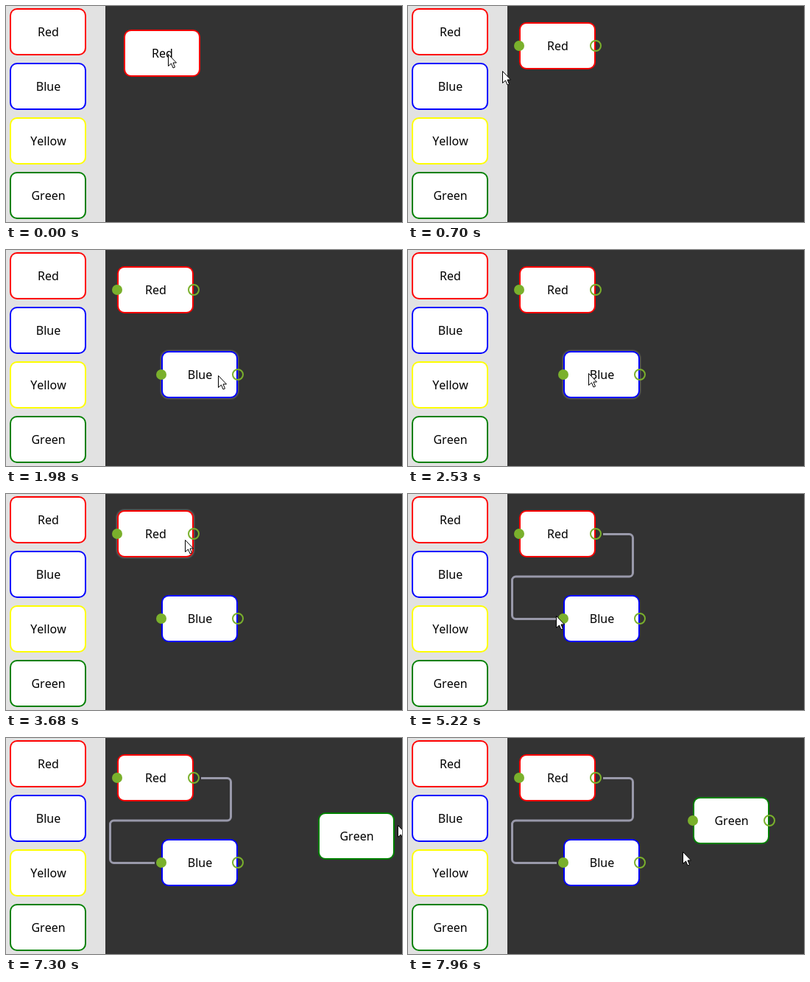
An HTML page with a canvas that plays this animation: 538 px wide and 293 px high, repeating every 8000 ms.

```html
<!DOCTYPE html>
<html lang="en">
<head>
<meta charset="utf-8">
<title>Drag and connect</title>
<style>
html, body { margin: 0; width: 100%; height: 100%; overflow: hidden; background: #333; }
canvas { display: block; }
</style>
</head>
<body>
<canvas id="stage" width="538" height="293"></canvas>
<script>
const ctx = document.getElementById('stage').getContext('2d');
const LOOP = 8000, TICK = 120, W = 104, H = 64, GREEN = '#7ab02c';

const red = { label: 'Red', color: '#f00' };
const blue = { label: 'Blue', color: '#00f' };
const yellow = { label: 'Yellow', color: '#ff0' };
const green = { label: 'Green', color: '#008000' };
const palette = [red, blue, yellow, green];

// Each node is dragged between two times and released at (x, y)
const nodes = [
  { kind: red, x: 151, y: 22, drag: 0, drop: 280 },
  { kind: blue, x: 211, y: 137, drag: 1310, drop: 1790 },
  { kind: green, x: 387, y: 80, drag: 6820, drop: 7690 }
];
const link = { drag: 4050, drop: 5220 };

// Pointer glides: start, end, x, y, sideways bend
const home = { x: 220, y: 65 };
const glides = [
  [160, 280, 211, 55],
  [400, 850, 83, 106],
  [1310, 1430, 247, 142],
  [1550, 1790, 289, 166],
  [1910, 2250, 284, 192],
  [2530, 2530, 245, 167],
  [2650, 3530, 215, 60, 130],
  [3680, 3680, 243, 62],
  [3930, 4660, 201, 165],
  [5470, 6160, 40, 150, -25],
  [6310, 6690, 106, 242],
  [6820, 6820, 122, 242],
  [6940, 7300, 532, 118],
  [7420, 7690, 495, 97],
  [7810, 7960, 373, 154]
];

const ease = p => p * p * (3 - 2 * p);

// The pointer is refreshed about once per TICK while it glides
function pointerAt(t) {
  let pos = home;
  for (const [start, end, x, y, bend = 0] of glides) {
    if (t < start) break;
    if (t >= end) { pos = { x, y }; continue; }
    const gaps = Math.round((end - start) / TICK);
    const step = Math.floor((t - start) / (end - start) * gaps);
    const f = ease((step + 1) / (gaps + 1));
    const dx = x - pos.x, dy = y - pos.y;
    const side = bend * Math.sin(Math.PI * f) / Math.hypot(dx, dy);
    pos = {
      x: Math.round(pos.x + dx * f + dy * side),
      y: Math.round(pos.y + dy * f - dx * side)
    };
    break;
  }
  return pos;
}

function fillBox(x, y, inset, color) {
  ctx.beginPath();
  ctx.roundRect(x + inset, y + inset, W - 2 * inset, H - 2 * inset, 10 - inset);
  ctx.fillStyle = color;
  ctx.fill();
}

function drawCard(kind, x, y, hover) {
  if (hover) {
    fillBox(x, y, -2, '#444');
    fillBox(x, y, -1, '#555');
  }
  fillBox(x, y, 0, kind.color);
  fillBox(x, y, 2, '#fff');
  ctx.fillStyle = '#000';
  ctx.fillText(kind.label, x + W / 2 + 0.5, y + 38);
}

function dot(x, y) {
  ctx.beginPath();
  ctx.arc(x, y, 7, 0, Math.PI * 2);
}

function drawPorts(n) {
  const y = n.y + H / 2;
  dot(n.x, y);
  ctx.fillStyle = GREEN;
  ctx.fill();
  dot(n.x + W, y);
  ctx.strokeStyle = GREEN;
  ctx.lineWidth = 2;
  ctx.stroke();
}

// Flowchart connector: stubs of 40 and 60 px with a 10 px gap at each port
function drawLink(from, to) {
  const sy = from.y + 0.5, ty = to.y + 0.5, mid = (sy + ty) / 2;
  const right = from.x + 50.5, left = to.x - 69.5;
  const r = Math.min(5, Math.abs(ty - sy) / 4);
  ctx.beginPath();
  ctx.moveTo(from.x + 10, sy);
  ctx.arcTo(right, sy, right, mid, r);
  ctx.arcTo(right, mid, left, mid, r);
  ctx.arcTo(left, mid, left, ty, r);
  ctx.arcTo(left, ty, to.x, ty, r);
  ctx.lineTo(to.x - 9, ty);
  ctx.strokeStyle = '#9999aa';
  ctx.lineWidth = 3;
  ctx.stroke();
}

const arrow = new Path2D('M.5 .5V16.5L4.5 13 7 19 9.5 18 7 12H11.5Z');

function drawPointer(p) {
  ctx.save();
  ctx.translate(p.x, p.y);
  ctx.fillStyle = '#fff';
  ctx.fill(arrow);
  ctx.strokeStyle = '#000';
  ctx.lineWidth = 1;
  ctx.stroke(arrow);
  ctx.restore();
}

function draw(t) {
  const p = pointerAt(t);
  const linking = t >= link.drag && t < link.drop;
  const placed = nodes.filter(n => t >= n.drop);
  const dragged = nodes.find(n => t >= n.drag && t < n.drop);
  const hovered = n => !dragged && !linking &&
    p.x >= n.x && p.x < n.x + W && p.y >= n.y && p.y < n.y + H;

  ctx.fillStyle = '#333';
  ctx.fillRect(0, 0, 538, 293);
  ctx.fillStyle = '#e2e2e2';
  ctx.fillRect(0, 0, 135, 293);
  ctx.font = '16px "Noto Sans", "Open Sans", sans-serif';
  ctx.fontKerning = 'none';
  ctx.textAlign = 'center';

  palette.forEach((kind, i) => drawCard(kind, 5, 3 + 74 * i, false));
  placed.forEach(n => drawCard(n.kind, n.x, n.y, hovered(n)));
  if (t >= link.drag) {
    const [a, b] = nodes;
    drawLink({ x: a.x + W, y: a.y + H / 2 }, linking ? p : { x: b.x, y: b.y + H / 2 });
  }
  placed.forEach(drawPorts);
  if (dragged) {
    const grip = pointerAt(dragged.drop);
    drawCard(dragged.kind, dragged.x + p.x - grip.x, dragged.y + p.y - grip.y, false);
  }
  drawPointer(p);
}

const start = performance.now();
function tick() {
  draw((performance.now() - start) % LOOP);
  requestAnimationFrame(tick);
}
tick();
</script>
</body>
</html>
```
